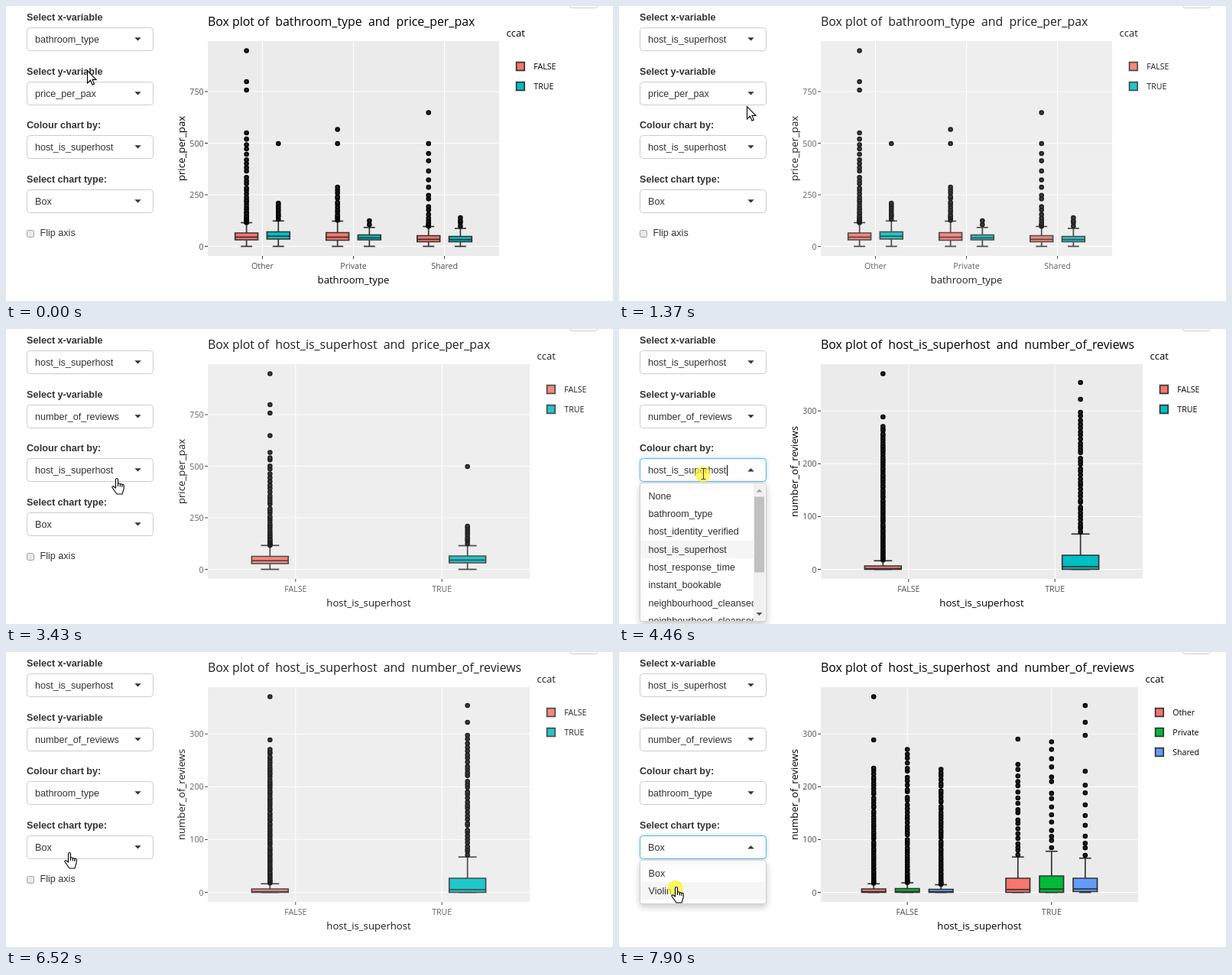
Write an HTML page with a canvas that moves like this. It is 794x386 px and loops after 8000 ms.

```html
<!DOCTYPE html>
<html lang="en">
<head>
<meta charset="utf-8">
<title>Box plot explorer</title>
<style>
html, body { margin: 0; width: 100%; height: 100%; overflow: hidden; background: #fff; }
canvas { display: block; }
</style>
</head>
<body>
<canvas id="stage" width="794" height="386"></canvas>
<script>
const g = document.getElementById('stage').getContext('2d');
const UI = '12.6px "Liberation Sans", Arial, sans-serif';
const PLOT = '"Open Sans", sans-serif';
const RED = '#F8766D', TEAL = '#00BFC4', GREEN = '#00BA38', BLUE = '#619CFF';
const LEFT = 264, TOP = 46, BOTTOM = 327, ZERO = 314.5;
const LOOP = 8000;

const flags = [['FALSE', RED], ['TRUE', TEAL]];
const price = { y: 'price_per_pax', step: 250, gap: 67.5, median: 0.6 };
const reviews = { y: 'number_of_reviews', step: 100, gap: 69.1, median: 0.8 };
const superhost = { x: 'host_is_superhost', right: 685, cats: ['FALSE', 'TRUE'], legend: flags };

// Box: [category, series, q3, q1, top of the outlier column, count, skew, ...lone outliers], in stage y
const charts = {
  bath: {
    ...price, x: 'bathroom_type', right: 645, cats: ['Other', 'Private', 'Shared'], legend: flags,
    boxes: [
      [0, 0, 297, 306, 166, 32, 2, 58.5, 99, 110],
      [0, 1, 295.5, 305, 258, 9, 1, 180],
      [1, 0, 296.5, 306.5, 237, 14, 1.3, 161.5, 180],
      [1, 1, 299.5, 306, 281, 2, 1],
      [2, 0, 300.5, 308.5, 193, 16, 2.2, 139.5, 180],
      [2, 1, 301.5, 308.5, 277, 4, 1]
    ]
  },
  price: {
    ...superhost, ...price,
    boxes: [
      [0, 0, 297.5, 307, 161.5, 38, 1.8, 58.5, 99, 110, 139.5],
      [1, 1, 297, 306, 258, 9, 1, 180]
    ]
  },
  reviews: {
    ...superhost, ...reviews,
    boxes: [
      [0, 0, 310, 314.5, 127.5, 68, 1.2, 58.5, 115],
      [1, 1, 296, 314.5, 109, 35, 1.1, 70, 92]
    ]
  },
  types: {
    ...superhost, ...reviews, right: 679,
    legend: [['Other', RED], ['Private', GREEN], ['Shared', BLUE]],
    boxes: [
      [0, 0, 310, 314.5, 152, 50, 1.3, 58.5, 115],
      [0, 1, 309.5, 314.5, 127.5, 46, 1.6],
      [0, 2, 310.5, 314.5, 153.5, 46, 1.4],
      [1, 0, 296, 314.5, 147, 19, 1.2, 114],
      [1, 1, 293, 314.5, 117.5, 15, 1.2],
      [1, 2, 296, 313.5, 156, 10, 1.4, 70, 92, 109]
    ]
  }
};

const factors = ['bathroom_type', 'host_identity_verified', 'host_is_superhost', 'host_response_time',
  'instant_bookable', 'neighbourhood_cleansed', 'neighbourhood_cleansed_group'];
const fields = [
  { label: 'Select x-variable', top: 28, items: factors, thumb: [18, 99] },
  { label: 'Select y-variable', top: 99, scroll: 19, thumb: [109, 26],
    items: ['minimum_nights', 'minimum_nights_avg_ntm', 'name_length', 'number_of_reviews', 'number_of_reviews_l30d',
      'number_of_reviews_ltm', 'price', 'price_per_pax', 'reviews_per_month'] },
  { label: 'Colour chart by:', top: 169, items: ['None', ...factors], thumb: [18, 99] },
  { label: 'Select chart type:', top: 240, items: ['Box', 'Violin'] }
];

// Each step overrides the state left by the steps before it
const closed = { open: -1, hover: -1, caret: false, click: false };
const steps = [
  [0, { ...closed, chart: 'bath', dim: false, cursor: 'arrow', x: 106, y: 84,
    xVar: 'bathroom_type', yVar: 'price_per_pax', colour: 'host_is_superhost' }],
  [330, { cursor: 'hand', x: 94, y: 53 }],
  [680, { open: 0, hover: 1, caret: true, x: 95, y: 103 }],
  [1030, { ...closed, dim: true, x: 95, y: 114, xVar: 'host_is_superhost' }],
  [1370, { cursor: 'arrow', x: 167, y: 131 }],
  [1720, { chart: 'price', dim: false, x: 158, y: 133 }],
  [2050, { cursor: 'hand', x: 142, y: 112 }],
  [2400, { open: 1, caret: true, x: 145, y: 147 }],
  [2730, { hover: 2, caret: false, x: 142, y: 172 }],
  [3080, { hover: 3, x: 137, y: 198 }],
  [3430, { ...closed, dim: true, x: 138, y: 195, yVar: 'number_of_reviews' }],
  [3760, { x: 102, y: 197 }],
  [4110, { chart: 'reviews', dim: false, x: 104, y: 188 }],
  [4460, { open: 2, hover: 3, caret: true, click: true, cursor: 'beam' }],
  [4810, { hover: 2, click: false, cursor: 'hand', x: 84, y: 270 }],
  [5150, { hover: 1, caret: false, x: 82, y: 248 }],
  [5480, { caret: true, x: 80, y: 238 }],
  [5830, { click: true, x: 81, y: 239 }],
  [6180, { ...closed, x: 79, y: 246, colour: 'bathroom_type' }],
  [6520, { dim: true, x: 76, y: 262 }],
  [6870, { chart: 'types', dim: false }],
  [7200, { x: 73, y: 264 }],
  [7550, { open: 3, hover: 0, caret: true, x: 72, y: 285 }],
  [7900, { hover: 1, caret: false, click: true, x: 68, y: 307 }]
];

const shapes = {
  hand: new Path2D('M5.5 13V2a1.5 1.5 0 0 1 3 0V8a1.4 1.4 0 0 1 2.8.3 1.4 1.4 0 0 1 2.5.6 1.3 1.3 0 0 1 2.4.8V14L14 21H7L1 12.5C.3 11.3 2 10.2 3.2 11.3ZM8.5 8v3M11.3 8.5v3M13.8 9v3'),
  arrow: new Path2D('M.5.5V17L4.4 13.3 7 19 9.4 18 6.9 12.4H12Z'),
  beam: new Path2D('M3.5-5.5H9.5M6.5-5.5V8.5M3.5 8.5H9.5')
};

// Repeatable pseudo-random number in 0..1
const noise = n => Math.abs(Math.sin(n * 127.1) * 43758.5) % 1;

function text(str, x, y, font, color = '#000', align = 'left') {
  g.font = font;
  g.fillStyle = color;
  g.textAlign = align;
  g.fillText(str, x, y);
}

function line(x1, y1, x2, y2, color, width) {
  g.strokeStyle = color;
  g.lineWidth = width;
  g.beginPath();
  g.moveTo(x1, y1);
  g.lineTo(x2, y2);
  g.stroke();
}

function rect(x, y, w, h, fill, stroke, radius = 0, width = 1) {
  g.beginPath();
  g.roundRect(x, y, w, h, radius);
  g.fillStyle = fill;
  g.fill();
  if (!stroke) return;
  g.strokeStyle = stroke;
  g.lineWidth = width;
  g.stroke();
}

function triangle(x, y, half, height, color) {
  g.fillStyle = color;
  g.beginPath();
  g.moveTo(x - half, y - height / 2);
  g.lineTo(x + half, y - height / 2);
  g.lineTo(x, y + height / 2);
  g.fill();
}

function circle(x, y, r, fill, stroke) {
  g.beginPath();
  g.arc(x, y, r, 0, 7);
  g.fillStyle = fill;
  g.fill();
  if (!stroke) return;
  g.strokeStyle = stroke;
  g.lineWidth = 1.6;
  g.stroke();
}

function drawBox(x, w, color, median, [q3, q1, top, count, skew, ...lone]) {
  const ink = '#333', lw = 1.7;
  const fence = q3 - 1.5 * (q1 - q3);
  const mid = q3 + median * (q1 - q3);
  line(x, fence, x, q3, ink, lw);
  line(x, q1, x, ZERO, ink, lw);
  for (const y of [fence, ZERO]) line(x - w / 4, y, x + w / 4, y, ink, lw);
  rect(x - w / 2, q3, w, q1 - q3, color, ink, 0, lw);
  line(x - w / 2, mid, x + w / 2, mid, ink, lw);

  const dot = y => circle(x, y, 2.5, '#222', '#000');
  lone.forEach(dot);
  for (let i = 1; i <= count; i++) {
    const u = i < count ? (i + noise(i) * 0.6 - 0.3) / count : 1;
    dot(fence - (fence - top) * u ** skew);
  }
}

function drawChart({ x, y, right, step, gap, median, cats, legend, boxes }) {
  const small = '10.6px ' + PLOT, medium = '13.15px ' + PLOT;
  const slot = (right - LEFT) / (cats.length + 0.2);
  const catX = i => LEFT + slot * (i + 0.6);
  const n = legend.length;

  text(`Box plot of  ${x}  and  ${y}`, LEFT, 25.7, '15.88px ' + PLOT);
  rect(LEFT, TOP, right - LEFT, BOTTOM - TOP, '#EBEBEB');
  for (let i = 0; i < 4; i++) {
    const py = ZERO - gap * i;
    line(LEFT, py, right, py, '#fff', 1);
    line(LEFT - 4, py, LEFT, py, '#333', 1);
    text(step * i, 258.5, py + 4, small, '#4d4d4d', 'right');
  }
  cats.forEach((name, i) => {
    line(catX(i), TOP, catX(i), BOTTOM, '#fff', 1);
    line(catX(i), BOTTOM, catX(i), BOTTOM + 4, '#333', 1);
    text(name, catX(i), 344, small, '#4d4d4d', 'center');
  });
  for (const [cat, series, ...stats] of boxes) {
    const shift = (series - (n - 1) / 2) * 0.7 / n;
    drawBox(catX(cat) + shift * slot, slot * 0.5 / n, legend[series][1], median, stats);
  }

  text(x, (LEFT + right) / 2, 362.5, medium, '#000', 'center');
  g.save();
  g.translate(234, 186.5);
  g.rotate(-Math.PI / 2);
  text(y, 0, 0, medium, '#000', 'center');
  g.restore();

  text('ccat', right + 9.5, 39.5, medium);
  legend.forEach(([name, color], i) => {
    const ly = 79 + 26 * i;
    rect(right + 22.6, ly - 5.3, 10.6, 10.6, color, '#333', 0, 1.7);
    text(name, right + 45.3, ly + 4, small);
  });
}

function drawField({ label, top }, value, focused, caret) {
  text(label, 27, top - 9, 'bold ' + UI, '#333');
  g.save();
  if (focused) {
    g.shadowColor = 'rgba(102,175,233,.4)';
    g.shadowBlur = 5;
  }
  rect(27.5, top + 0.5, 165, 30, '#fff', focused ? '#66afe9' : '#ccc', 4);
  g.restore();
  text(value, 38, top + 19.5, UI, '#333');
  if (caret) rect(Math.round(39 + g.measureText(value).width), top + 9, 1, 14, '#000');
  triangle(172.5, top + 15.3, 4.2, focused ? -4.2 : 4.2, '#333');
}

function drawList({ top, items, scroll = 0, thumb }, hover) {
  const y = top + 32.5, row = 23.35;
  const h = thumb ? 181 : 57;
  g.save();
  g.shadowColor = 'rgba(0,0,0,.2)';
  g.shadowBlur = 9;
  g.shadowOffsetY = 4;
  rect(27.5, y, 165, h, '#fff', '#d0d0d0', 3);
  g.restore();

  g.save();
  g.beginPath();
  g.rect(28, y + 0.5, thumb ? 148 : 164, h - 1);
  g.clip();
  items.forEach((item, i) => {
    const mid = y + 16.8 + row * i - scroll;
    if (i === hover) rect(28, mid - row / 2, 164, row, '#f5f5f5');
    text(item, 38.5, mid + 4.3, UI, '#303030');
  });
  g.restore();

  if (!thumb) return;
  rect(176, y + 1, 15, h - 2, '#f1f1f1');
  rect(177, y + thumb[0], 13, thumb[1], '#c1c1c1');
  triangle(183.5, y + 10, 4, -4, scroll ? '#505050' : '#a3a3a3');
  triangle(183.5, y + h - 9.5, 4, 4, '#505050');
}

function drawCursor({ cursor, x, y, click }) {
  if (click) circle(x + 5.5, y + 2, 10.3, 'rgba(252,244,50,.75)');
  g.save();
  g.translate(x, y);
  g.fillStyle = '#fff';
  g.strokeStyle = cursor === 'beam' ? '#444' : '#000';
  g.lineWidth = 1.1;
  if (cursor !== 'beam') g.fill(shapes[cursor]);
  g.stroke(shapes[cursor]);
  g.restore();
}

function draw(t) {
  const s = Object.assign({}, ...steps.filter(([at]) => at <= t).map(step => step[1]));
  rect(0, 0, 794, 386, '#fff');
  drawChart(charts[s.chart]);
  if (s.dim) rect(220, 6, 574, 380, 'rgba(255,255,255,.12)');
  rect(737.5, -12, 36, 14.5, '#fff', '#ccc', 3);

  const values = [s.xVar, s.yVar, s.colour, 'Box'];
  fields.forEach((field, i) => drawField(field, values[i], i === s.open, i === s.open && s.caret));
  rect(27.5, 293.5, 9, 9, '#e9e9e9', '#a0a0a0', 2);
  text('Flip axis', 44.5, 301, UI, '#333');
  if (s.open >= 0) drawList(fields[s.open], s.hover);
  drawCursor(s);
}

const start = performance.now();
function frame() {
  draw((performance.now() - start) % LOOP);
  requestAnimationFrame(frame);
}
frame();
</script>
</body>
</html>
```
